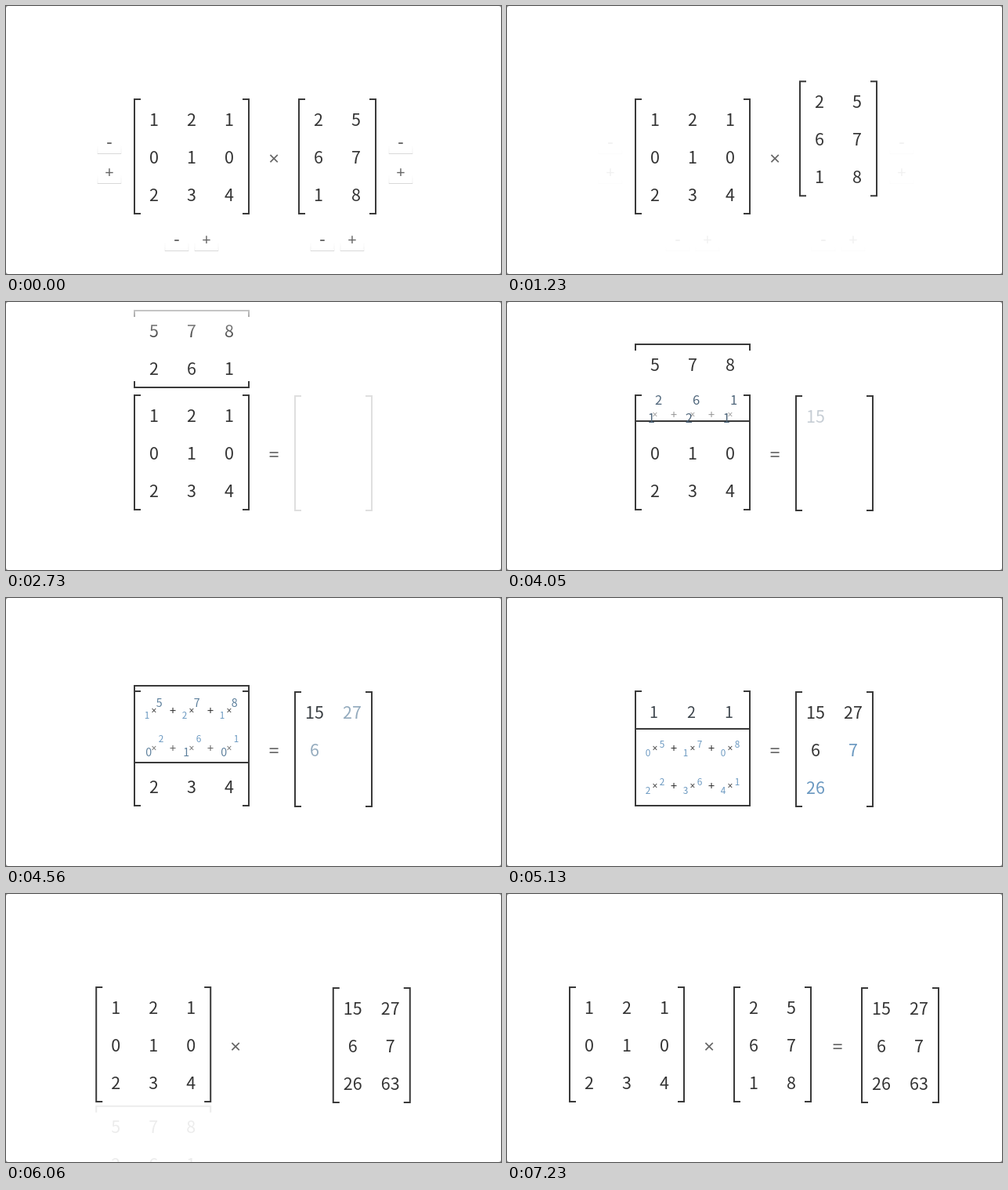
These frames come from a looping animation (632 px wide and 342 px high, 8310 ms). An HTML page with a canvas:

```html
<!DOCTYPE html>
<html lang="en">
<head>
<meta charset="utf-8">
<title>Matrix multiplication</title>
<style>
  html, body { margin: 0; width: 100%; height: 100%; overflow: hidden; background: #fff; }
  canvas { display: block; width: 632px; height: 342px; }
</style>
</head>
<body>
<canvas id="stage"></canvas>
<script>
const W = 632, H = 342, LOOP = 8310, GAP = 48;
const DIGITS = '"Noto Sans CJK JP", "Noto Sans CJK SC", "Noto Sans CJK KR", "Noto Sans CJK", sans-serif';
const SIGNS = '"Noto Sans", "Open Sans", sans-serif';
const DARK = [51, 51, 51], BLUE = [106, 152, 192], GREY = '#666';
const SIZE = 21.5, SMALL = 0.55;

const A = [[1, 2, 1], [0, 1, 0], [2, 3, 4]];
const B = [[2, 5], [6, 7], [1, 8]];
const C = A.map(row => [0, 1].map(j => row.reduce((sum, v, k) => sum + v * B[k][j], 0)));

// Timeline in ms
const T = {
  lift: 1050, turn: 1730, turned: 2400,
  frame: 2698, framed: 3090,
  steps: 3755, step: 460,
  part: 5650, parted: 6395,
  back: 6450, done: 7230
};
const DROPS = [60, GAP, GAP, GAP];
const SPREAD = 84;

const canvas = document.getElementById('stage');
const ratio = window.devicePixelRatio || 1;
canvas.width = W * ratio;
canvas.height = H * ratio;
const ctx = canvas.getContext('2d');

const clamp = x => Math.min(1, Math.max(0, x));
const ease = x => 0.5 - 0.5 * Math.cos(Math.PI * clamp(x));
const span = (t, from, to) => clamp((t - from) / (to - from));
const mix = (a, b, p) => a + (b - a) * p;
const tint = p => `rgb(${DARK.map((v, i) => Math.round(mix(v, BLUE[i], p))).join(',')})`;

// Text centred on the middle of its ink; mid is that height in em
function label(text, x, y, size, color, font, mid) {
  ctx.font = `${size}px ${font}`;
  ctx.fillStyle = color;
  ctx.fillText(text, x, y + size * mid);
}
const digit = (v, x, y, blend = 0) =>
  label(String(v), x, y, SIZE * mix(1, SMALL, blend), tint(blend), DIGITS, 0.366);
const sign = (s, x, y, size, color) => label(s, x, y, size, color, SIGNS, 0.357);

function faded(alpha, draw) {
  if (alpha <= 0) return;
  ctx.save();
  ctx.globalAlpha *= alpha;
  draw();
  ctx.restore();
}

function brackets(cx, cy, w, h, angle = 0) {
  ctx.save();
  ctx.translate(cx, cy);
  ctx.rotate(angle);
  ctx.strokeStyle = '#3a3a3a';
  ctx.lineWidth = 2;
  ctx.beginPath();
  for (const side of [-1, 1]) {
    const out = side * (w / 2 - 1), tip = side * (w / 2 - 9), y = h / 2 - 1;
    ctx.moveTo(tip, -y);
    ctx.lineTo(out, -y);
    ctx.lineTo(out, y);
    ctx.lineTo(tip, y);
  }
  ctx.stroke();
  ctx.restore();
}

function button(text, x, y) {
  const edge = ctx.createLinearGradient(0, y + 18, 0, y + 30);
  edge.addColorStop(0, 'rgba(0,0,0,0)');
  edge.addColorStop(1, 'rgba(0,0,0,.07)');
  ctx.fillStyle = edge;
  ctx.fillRect(x - 0.5, y + 18, 1, 12);
  ctx.fillRect(x + 29.5, y + 18, 1, 12);
  ctx.fillStyle = '#d9d9d9';
  ctx.fillRect(x, y + 29, 30, 1);
  if (text === '+') sign('+', x + 15, y + 14.5, 20, GREY);
  else label('-', x + 15, y + 16, 23, GREY, SIGNS, 0.268);
}

function buttons() {
  for (const x of [117, 489]) {
    button('-', x, 159);
    button('+', x, 197);
  }
  for (const x of [203, 389]) {
    button('-', x, 283);
    button('+', x + 38, 283);
  }
}

const enter = (s, k) => ease((s - k - 0.3) / 0.68);
const leave = (s, k) => ease((s - k - 0.45) / 0.75);

function left(s, shift) {
  brackets(237 - shift, 192, 148, 148);
  A.forEach((row, i) => {
    const y = 145 + i * GAP;
    const on = enter(s, i);
    const blend = on * (1 - leave(s, i === 2 ? 3.7 : i + 2));
    row.forEach((v, k) => {
      const x = 189 + k * GAP - shift;
      digit(v, x - 9 * blend, y + 5 * blend, blend);
      faded(on * (1 - ease((s - i - 2) / 0.7)), () => {
        sign('×', x, y - 1, 12, '#444');
        if (k < 2) sign('+', x + 24, y - 1, 15, '#333');
      });
    });
  });
}

function right(cx, cy, angle, s) {
  const cos = Math.cos(angle), sin = Math.sin(angle);
  brackets(cx, cy, 100, 148, angle);
  B.forEach((row, i) => row.forEach((v, j) => {
    const dx = (j - 0.5) * GAP, dy = (i - 1) * GAP;
    const blend = enter(s, j) * (1 - leave(s, j ? 3.7 : 3));
    digit(v, cx + dx * cos - dy * sin + 9 * blend,
      cy + 1 + dx * sin + dy * cos - 6 * blend, blend);
  }));
}

function product(t, s, shift) {
  const p = 1 - span(t, T.frame, T.framed);
  faded(1 - p * p, () => brackets(418 + shift, 193, 100, 148));
  C.forEach((row, i) => row.forEach((v, j) => {
    const k = i + j;
    const blue = enter(s, k) * (1 - ease((s - k - 1.2) / 0.7));
    faded(ease((s - k - 0.45) / 0.5), () => {
      label(String(v), 394 + j * GAP + shift, 146 + i * GAP, SIZE, tint(blue), DIGITS, 0.366);
    });
  }));
}

function movingMatrix(t, s, shift) {
  if (t >= T.parted) {
    faded(ease(span(t, T.back, T.done)), () => right(423 - SPREAD, 192, 0, -1));
    return;
  }
  const lift = ease(span(t, T.lift, 1790));
  const slide = ease(span(t, T.turn, T.turned));
  const turn = Math.pow(slide, 1.4);
  const part = span(t, T.part, T.parted);
  const drop = DROPS.reduce((sum, d, k) => sum + d * ease(s - k), 0) + 2 * GAP * ease(part);
  const x = mix(423, 237, slide) - shift;
  const y = mix(192, 30.5, lift) + 29.5 * turn + drop;
  faded(1 - clamp(part / 0.61), () => right(x, y, -Math.PI / 2 * turn, s));
}

function topFade() {
  const g = ctx.createLinearGradient(0, 0, 0, 50);
  g.addColorStop(0, 'rgba(255,255,255,.9)');
  g.addColorStop(1, 'rgba(255,255,255,0)');
  ctx.fillStyle = g;
  ctx.fillRect(0, 0, W, 50);
}

function background() {
  ctx.fillStyle = '#888';
  ctx.fillRect(0, 0, W, H);
}

// Rounded window corners
function corners() {
  ctx.fillStyle = '#888';
  ctx.beginPath();
  ctx.rect(0, 0, W, H);
  ctx.roundRect(0, 0, W, H, 3);
  ctx.fill('evenodd');
}

function draw(t) {
  const s = (t - T.steps) / T.step;
  const shift = SPREAD * ease(span(t, T.part, T.parted));
  ctx.setTransform(ratio, 0, 0, ratio, 0, 0);
  ctx.textAlign = 'center';
  ctx.textBaseline = 'alphabetic';
  ctx.fillStyle = '#fff';
  ctx.fillRect(0, 0, W, H);

  movingMatrix(t, s, shift);
  topFade();
  left(s, shift);
  product(t, s, shift);

  const equals = t >= T.turned && t < T.part;
  sign(equals ? '=' : '×', 342 - shift, 194, 24, GREY);
  faded(ease(span(t, T.back, T.done)), () => sign('=', 422, 194, 24, GREY));
  faded(1 - span(t, T.lift, T.lift + 200), buttons);
  corners();
}

const start = performance.now();
function tick() {
  draw((performance.now() - start) % LOOP);
  requestAnimationFrame(tick);
}
tick();
</script>
</body>
</html>
```
